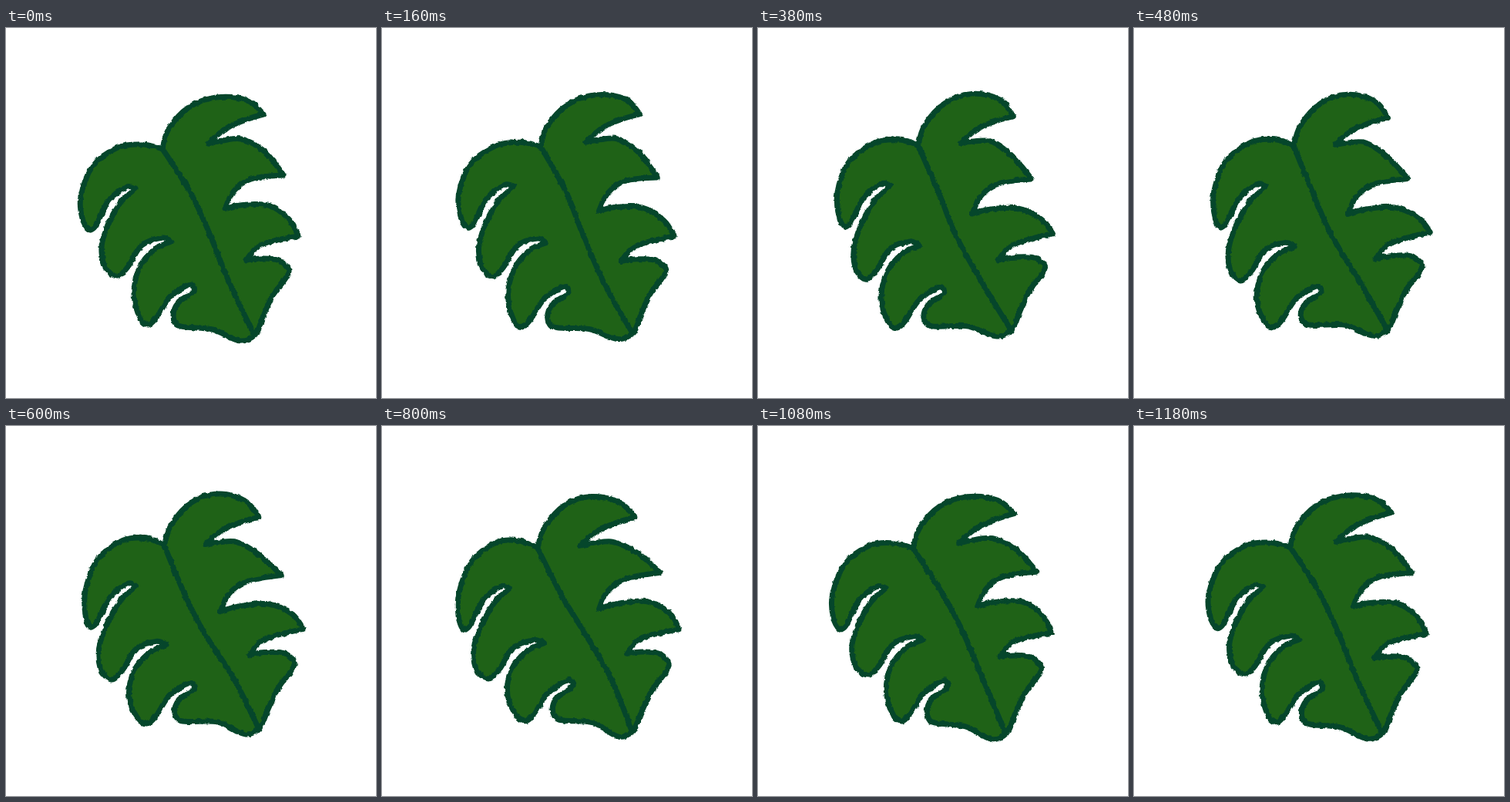
Write an HTML page that moves like this. It is 480 px wide and 480 px high and loops after 1200 ms.

```html
<!DOCTYPE html>
<html lang="en">
<head>
<meta charset="utf-8">
<title>Waving leaf</title>
<style>
  html, body { margin: 0; width: 100%; height: 100%; overflow: hidden; background: #fff; }
  svg { display: block; width: 100%; height: 100%; }
  path { stroke: #05462b; stroke-width: 7; stroke-linecap: round; stroke-linejoin: round; }
</style>
</head>
<body>
<svg viewBox="0 0 480 480">
  <filter id="rough" filterUnits="userSpaceOnUse" x="0" y="0" width="480" height="480" color-interpolation-filters="sRGB">
    <feTurbulence type="fractalNoise" baseFrequency=".15" numOctaves="3" seed="4" result="noise"/>
    <feDisplacementMap in="SourceGraphic" in2="noise" scale="4" xChannelSelector="R" yChannelSelector="G"/>
  </filter>
  <g filter="url(#rough)">
    <path id="blade" fill="#1f6217"/>
    <path id="rib" fill="none"/>
  </g>
</svg>
<script>
const LOOP = 1200, STEP = 20, SWAY = 3.6;

// Smooth runs, split by "/" where the outline has a sharp corner.
const parse = text => text.split('/').map(run =>
  run.trim().split(/\s+/).map(p => p.split(',').map(Number)));

const blade = parse(`203,157 211,131 237,103 273,90 313,94 334,112
  / 314,118 286,130 262,150
  / 281,146 305,144 334,159 360,191
  / 318,196 296,211 284,235
  / 303,230 340,230 367,248 379,270
  / 340,278 324,286 312,301
  / 331,299 355,302 367,316 346,347 334,373 323,398 304,406 268,391 223,386 217,373
    223,357 244,341 240,332 213,349 195,376 185,385 175,379 166,346 173,311 193,287 215,277
  / 203,272 176,282 158,310 144,322 128,309 125,277 146,230 168,208
  / 157,206 133,224 116,257 108,262 99,247 97,219 112,180 145,155 178,151 203,157`);
const rib = parse('203,157 240,215 262,262 290,331 321,396');

// Each run begins where the previous one ended.
blade.forEach((run, i) => { if (i) run.unshift(blade[i - 1].at(-1)); });

// A diagonal sine wave travels across the leaf and shifts it at right angles.
function warp([x, y], t) {
  const peak = -75 - 3.05 * (x + y - 503);
  const wave = time => Math.cos(2 * Math.PI * (time - peak) / LOOP);
  const d = SWAY * (wave(t) - wave(0));
  return [x + d, y - d];
}

// Chord-length spline through the points, as cubic Bezier commands.
function curve(pts) {
  const last = pts.length - 1;
  const len = pts.slice(1).map((p, i) => Math.hypot(p[0] - pts[i][0], p[1] - pts[i][1]));
  const slope = (a, b, l) => [0, 1].map(k => (pts[b][k] - pts[a][k]) / l);
  const tan = pts.map((p, i) => i && i < last ? slope(i - 1, i + 1, len[i - 1] + len[i]) : null);
  const end = (i, near) => slope(i, i + 1, len[i]).map((v, k) => 1.5 * v - 0.5 * tan[near][k]);
  tan[0] = end(0, 1);
  tan[last] = end(last - 1, last - 1);
  const handle = (i, l) => pts[i].map((v, k) => (v + tan[i][k] * l / 3).toFixed(2));
  return len.map((l, i) =>
    `C${handle(i, l)} ${handle(i + 1, -l)} ${pts[i + 1].map(v => v.toFixed(2))}`).join('');
}

const outline = (runs, t) => 'M' + warp(runs[0][0], t) +
  runs.map(run => curve(run.map(p => warp(p, t)))).join('');

const bladePath = document.getElementById('blade');
const ribPath = document.getElementById('rib');

function draw(now) {
  const t = Math.floor((now % LOOP) / STEP) * STEP;
  bladePath.setAttribute('d', outline(blade, t) + 'Z');
  ribPath.setAttribute('d', outline(rib, t));
}

const start = performance.now();
function tick() {
  draw(performance.now() - start);
  requestAnimationFrame(tick);
}
tick();
</script>
</body>
</html>
```
